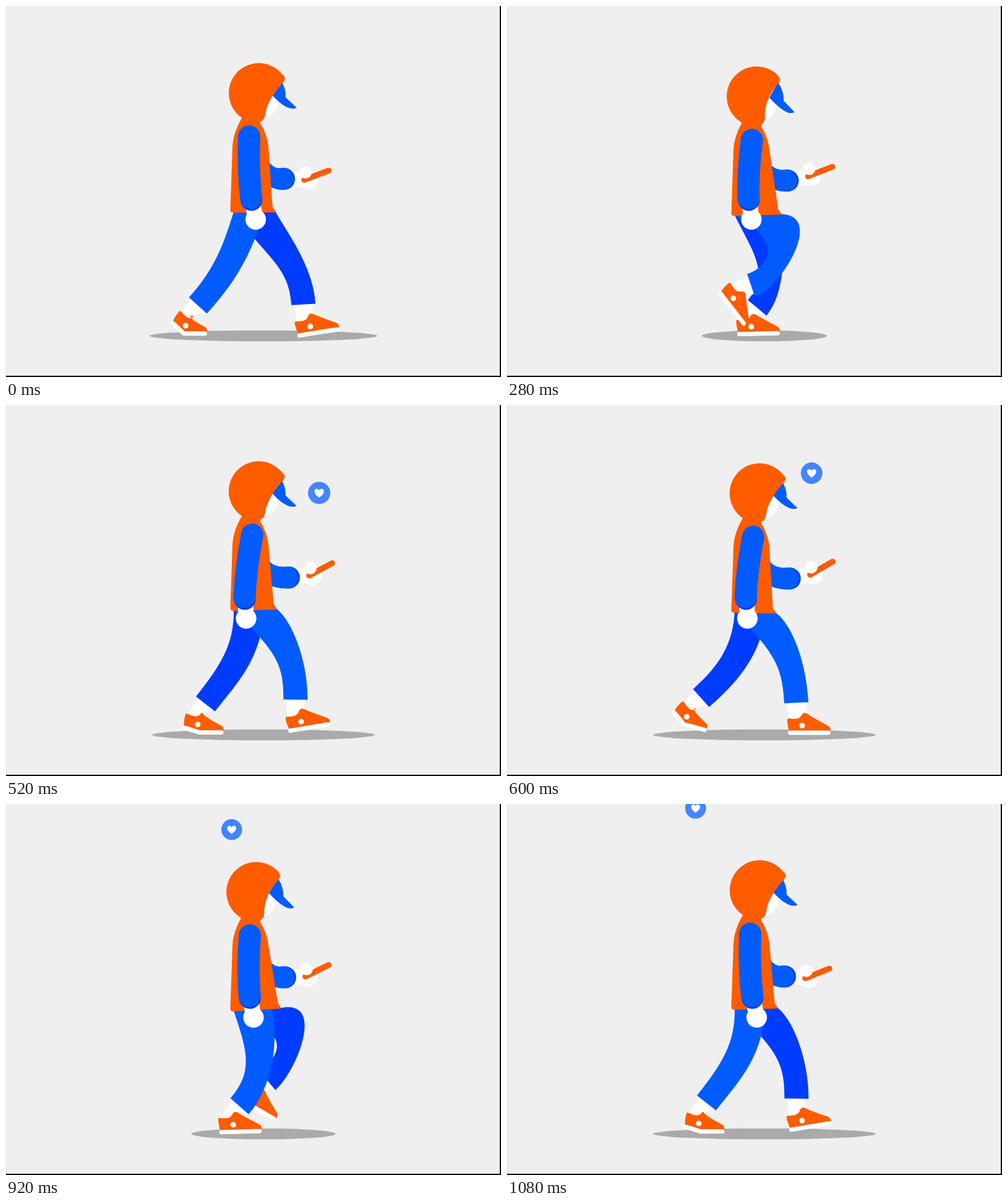
An HTML page with a canvas that plays this animation: 800x600 px, repeating every 1.12 s.

```html
<!DOCTYPE html>
<html lang="en">
<head>
<meta charset="utf-8">
<title>Walking with a phone</title>
<style>
  html, body { margin: 0; width: 100%; height: 100%; overflow: hidden; background: #efefef; }
  canvas { display: block; }
</style>
</head>
<body>
<canvas id="stage" width="800" height="600"></canvas>
<script>
const ctx = document.getElementById('stage').getContext('2d');
const LOOP = 1120, STEP = LOOP / 2, TICK = 40, TAU = Math.PI * 2;
const ORANGE = '#ff5c00', BLUE = '#005cff', DEEP = '#003cff', WHITE = '#fff';
const GROUND = 533.5, HIP = [404, 335], LEG = 184;

// Key poses of a foot: time, ball x, ball y, heel angle.
const FOOT = [
  [0, 286, 533, 43], [40, 284, 519.5, 50], [200, 322, 488, 61],
  [360, 400, 494, 35], [440, 444, 511, -2], [560, 501, 532, -9],
  [600, 484, GROUND, 0], [1000, 346.5, GROUND, 0], [1080, 312.5, 533, 17]
];

const rad = deg => deg * Math.PI / 180;
const clamp = v => Math.min(1, Math.max(0, v));
const wave = (t, period, peak) => Math.cos(TAU * (t - peak) / period);
const add = (p, q, k = 1) => [p[0] + q[0] * k, p[1] + q[1] * k];
const lerp = (p, q, k) => [p[0] + (q[0] - p[0]) * k, p[1] + (q[1] - p[1]) * k];
const turn = ([x, y], deg) => {
  const c = Math.cos(rad(deg)), s = Math.sin(rad(deg));
  return [x * c - y * s, x * s + y * c];
};

// Smooth periodic curve through the key poses.
function sample(rows, time) {
  const t = time % LOOP, n = rows.length;
  let i = n - 1;
  while (rows[i][0] > t) i--;
  const row = k => {
    const [at, ...rest] = rows[(k + n) % n];
    return [at + Math.floor(k / n) * LOOP, ...rest];
  };
  const [a, b, c, d] = [row(i - 1), row(i), row(i + 1), row(i + 2)];
  const h = c[0] - b[0], u = (t - b[0]) / h;
  return [1, 2, 3].map(j => {
    const m0 = (c[j] - a[j]) / (c[0] - a[0]) * h;
    const m1 = (d[j] - b[j]) / (d[0] - b[0]) * h;
    const e = c[j] - b[j];
    return b[j] + u * (m0 + u * (3 * e - 2 * m0 - m1 + u * (m0 + m1 - 2 * e)));
  });
}

function fill(color, draw) {
  ctx.fillStyle = color;
  ctx.beginPath();
  draw();
  ctx.fill();
}

const disc = (color, x, y, r) => fill(color, () => ctx.arc(x, y, r, 0, TAU));

function stroke(color, width, cap, draw) {
  ctx.strokeStyle = color;
  ctx.lineWidth = width;
  ctx.lineCap = cap;
  ctx.lineJoin = 'round';
  ctx.beginPath();
  draw();
  ctx.stroke();
}

const line = (color, width, cap, p, q) =>
  stroke(color, width, cap, () => { ctx.moveTo(...p); ctx.lineTo(...q); });

// Shoe space: heel at x = 0, toe at 69, sole on y = 0, ball of the foot at x = 30.
function footSpace(t) {
  const [x, rawY, heel] = sample(FOOT, t);
  const y = Math.min(rawY, GROUND);
  const toe = heel > 0 ? heel * clamp((GROUND - y) / 46) : heel;
  const at = (px, py) => {
    const angle = heel + (toe - heel) * clamp((px - 22) / 16);
    return add([x, y], turn([px - 30, py], angle));
  };
  return at;
}

function shoe(at) {
  const curve = (x1, y1, x2, y2) => ctx.quadraticCurveTo(...at(x1, y1), ...at(x2, y2));
  fill(ORANGE, () => {
    ctx.moveTo(...at(2, -6));
    curve(-1, -16, -1, -24);
    curve(-1, -27, 2, -26.5);
    ctx.bezierCurveTo(...at(14, -25), ...at(19, -26), ...at(22, -32));
    curve(25, -37, 30, -35);
    curve(34, -32, 48, -24);
    ctx.lineTo(...at(66, -14));
    curve(69, -12, 69, -6);
    ctx.lineTo(...at(30, -6));
  });
  stroke(WHITE, 7, 'round', () => {
    ctx.moveTo(...at(3.5, -3.5));
    for (const x of [22, 30, 38, 65.5]) ctx.lineTo(...at(x, -3.5));
  });
  disc(WHITE, ...at(23, -15), 4.5);
}

function leg(t, color, bob, corner) {
  const at = footSpace(t);
  const tilt = 37.4 + 27.6 * wave(t, LOOP, 108) + 18.5 * wave(t, STEP, 261);
  const up = turn([0, -1], tilt), across = turn([19.5, 0], tilt);
  const hem = add(at(15, -24), up, 28);
  const back = add(hem, across, -1), front = add(hem, across);

  // The knee bows forward as the ankle comes closer to the hip.
  const dx = hem[0] - HIP[0], dy = hem[1] - HIP[1], d = Math.hypot(dx, dy);
  const normal = [dy / d, -dx / d];
  const knee = add(lerp(HIP, hem, .5), normal, .66 * (LEG - d));
  const hipBack = [368, 333 + bob];
  const hipFront = [corner[0] - 20 * Math.max(0, wave(t, LOOP, 1040)), corner[1] - 1];

  // Controls of an edge that passes mid halfway and meets the hem squarely.
  const controls = (top, mid, end) => {
    const low = add(end, up, d * .38);
    return [[0, 1].map(i => (8 * mid[i] - top[i] - end[i]) / 3 - low[i]), low];
  };

  fill(WHITE, () => {
    ctx.moveTo(...lerp(back, front, .12));
    ctx.lineTo(...lerp(back, front, .88));
    for (const p of [[30, -34], [28, -18], [4, -18], [2, -26]]) ctx.lineTo(...at(...p));
  });
  shoe(at);
  fill(color, () => {
    const [b1, b2] = controls(hipBack, add(knee, normal, -21.5), back);
    const [f1, f2] = controls(hipFront, add(knee, normal, 21.5), front);
    ctx.moveTo(...hipBack);
    ctx.bezierCurveTo(...b1, ...b2, ...back);
    ctx.lineTo(...front);
    ctx.bezierCurveTo(...f2, ...f1, ...hipFront);
  });
}

function phoneArm(t, swing, bob) {
  const x = 453.2 - 4 * swing, y = 281 + (bob - 2.6) / 2;
  const phone = [486 - 4 * swing, 276.9 + 3 * swing - .45 * (bob - 2.6)];
  const palm = add(phone, [5, -.5]);
  line(WHITE, 24, 'butt', [x, y], palm);
  disc(DEEP, x, y, 17.8);
  fill(BLUE, () => {
    ctx.moveTo(415, y - 42);
    ctx.lineTo(426, y - 26);
    ctx.quadraticCurveTo(434, y - 17, x - 8, y - 17.5);
    ctx.arc(x - 3, y, 17.8, -Math.PI / 2, Math.PI / 2);
    ctx.quadraticCurveTo(437, y + 18, 425, y + 12);
  });
  disc(WHITE, ...palm, 16);
  line(ORANGE, 9.5, 'round', phone, add(phone, turn([42, 0], -25 + 5.7 * wave(t, LOOP, 130))));
  disc(WHITE, ...add(phone, [2, -12]), 10);
}

function nearArm(swing, bob) {
  const shoulder = [395.5 - 2.5 * swing, 211.3 + bob];
  const cuff = [391.3 + 5.4 * swing, 313.5];
  const hand = [395.8 + 7.8 * swing, 345.2];
  const [mx, my] = lerp(shoulder, cuff, .5);
  line(WHITE, 25, 'butt', add(cuff, [1, 0]), hand);
  disc(WHITE, ...hand, 16.6);
  disc(DEEP, ...cuff, 17.8);
  stroke(BLUE, 36, 'round', () => {
    ctx.moveTo(...shoulder);
    ctx.quadraticCurveTo(mx - 4, my, cuff[0] - .5, cuff[1] - 3.5);
  });
}

function vest(bob, [cx, cy]) {
  ctx.save();
  ctx.translate(0, bob);
  cy -= bob;
  fill(ORANGE, () => {
    ctx.moveTo(383, 178);
    ctx.quadraticCurveTo(367, 204, 366, 228);
    ctx.lineTo(362.5, 330);
    ctx.quadraticCurveTo(362.5, 334, 367, 334.3);
    ctx.lineTo(cx - 2, cy);
    ctx.quadraticCurveTo(cx + 1, cy, cx - 1, cy - 3);
    ctx.lineTo(cx - 5, cy - 9);
    ctx.lineTo(424, 226);
    ctx.quadraticCurveTo(421, 205, 411, 190);
    ctx.lineTo(411, 178);
  });
  ctx.restore();
}

function head(t, bob) {
  const dx = -2.4 + 2.5 * wave(t, STEP, -5);
  ctx.save();
  ctx.translate(dx, bob);
  disc(WHITE, 411, 153, 29.5);
  fill(BLUE, () => {
    const drop = -dx * .35;
    ctx.moveTo(443, 118);
    ctx.quadraticCurveTo(453, 134, 452, 148);
    ctx.lineTo(469.5, 164.5 + drop);
    ctx.quadraticCurveTo(466, 167 + drop, 459, 165.5 + drop);
    ctx.quadraticCurveTo(446, 162, 429, 143);
  });
  // The brow of the hood leans back while the neck stays put.
  const lean = (x, y) => [x + dx * .9, y + dx * .7];
  fill(ORANGE, () => {
    ctx.arc(408.5, 141, 48.5, 2.15, 5.52 + dx * .02);
    ctx.lineTo(...lean(448, 112));
    ctx.quadraticCurveTo(...lean(452.5, 117), ...lean(449, 122));
    ctx.bezierCurveTo(...lean(430, 143), 421, 160, 419 - dx * .6, 176);
    ctx.quadraticCurveTo(417 - dx * .6, 186, 410 - dx, 187);
    ctx.lineTo(383 - dx, 187);
  });
  ctx.restore();
}

function like(t) {
  if (t <= 300) return;
  const v = (t - 440) / 640;
  const x = 395 + 114 * Math.cos(Math.PI * Math.max(0, (t - 464) / 779));
  const y = 185 - 178 * v - 215 * v * (1 - v) ** 2;
  const r = (16.8 + 2.2 * Math.exp(-v * 5)) * clamp((t - 300) / 120);
  ctx.save();
  ctx.translate(x, y);
  disc('#4485ff', 0, 0, r);
  ctx.scale(r / 20, r / 20);
  fill(WHITE, () => {
    ctx.moveTo(0, 8.5);
    ctx.bezierCurveTo(-4, 5, -8.5, 2, -8.5, -2.8);
    ctx.bezierCurveTo(-8.5, -8, -2, -9.2, 0, -4.5);
    ctx.bezierCurveTo(2, -9.2, 8.5, -8, 8.5, -2.8);
    ctx.bezierCurveTo(8.5, 2, 4, 5, 0, 8.5);
  });
  ctx.restore();
}

function render(t) {
  const bob = 2.6 + 4.7 * wave(t, STEP, 195);
  const swing = wave(t, LOOP, -20);
  const corner = [439.5 + 5 * wave(t, STEP, 345), 333 + bob + 3.8 * wave(t, STEP, 120)];

  ctx.fillStyle = '#efefef';
  ctx.fillRect(0, 0, 800, 600);
  fill('#aaa', () => ctx.ellipse(416, GROUND, 142.5 + 41.5 * wave(t, STEP, 0), 8.8, 0, 0, TAU));
  like(t);
  phoneArm(t, swing, bob);
  leg(t + STEP, DEEP, bob, corner);
  leg(t, BLUE, bob, corner);
  head(t, bob);
  vest(bob, corner);
  nearArm(swing, bob);

  ctx.fillStyle = '#e0e0e0';
  ctx.fillRect(0, 0, 1, 600);
  ctx.fillStyle = '#000';
  ctx.fillRect(798, 0, 2, 600);
  ctx.fillRect(0, 598, 800, 2);
}

function tick() {
  // A small lead keeps each pose from starting late.
  render(Math.floor((performance.now() + 4) / TICK) * TICK % LOOP);
  requestAnimationFrame(tick);
}
tick();
</script>
</body>
</html>
```
